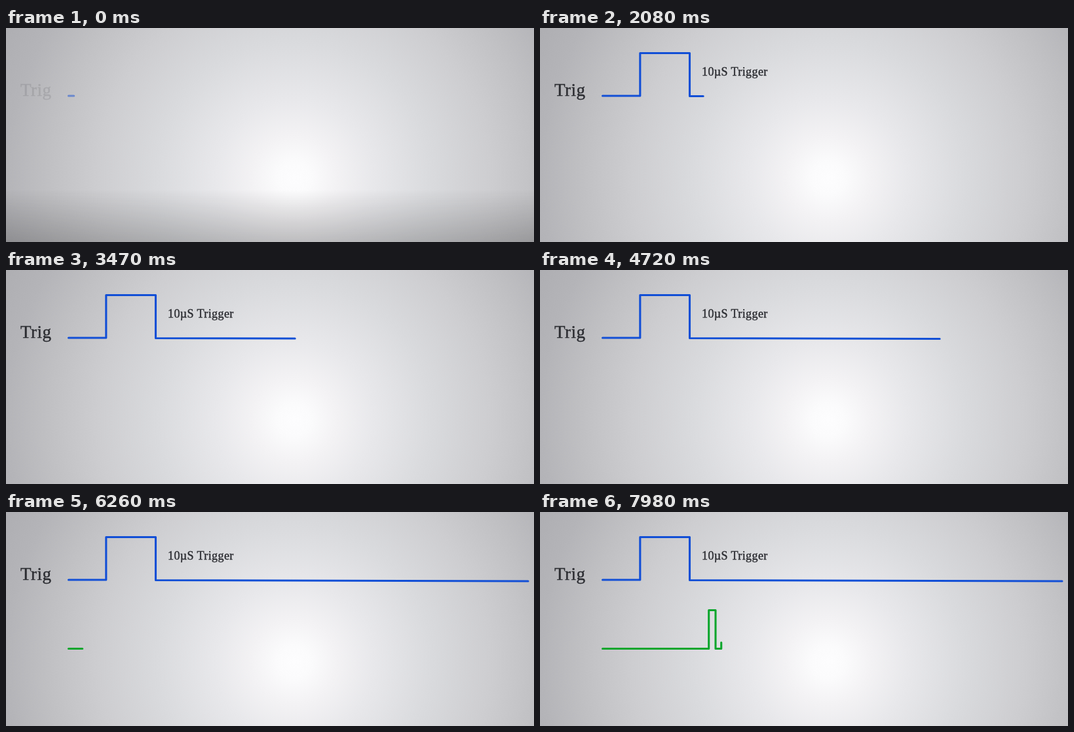
These frames come from a looping animation (806x328 px, 8 s). An HTML page:

```html
<!DOCTYPE html>
<html lang="en">
<head>
<meta charset="utf-8">
<title>Trigger timing</title>
<style>
  html, body { margin: 0; width: 100%; height: 100%; overflow: hidden; background: #c8c8cb; }
  svg { display: block; width: 806px; height: 328px; }
  text { font-family: "Liberation Serif", "Times New Roman", serif; fill: #2b2c31; stroke: #2b2c31; stroke-width: .4; }
  path { fill: none; stroke-width: 3.1; stroke-linecap: round; stroke-linejoin: round; }
</style>
</head>
<body>
<svg viewBox="0 0 806 328">
  <defs>
    <radialGradient id="glow" gradientUnits="userSpaceOnUse" cx="440" cy="230" r="500">
      <stop offset="0" stop-color="#fdfdfe"/>
      <stop offset=".05" stop-color="#fbfbfc"/>
      <stop offset=".13" stop-color="#f3f2f4"/>
      <stop offset=".24" stop-color="#e8e8eb"/>
      <stop offset=".42" stop-color="#d9dadd"/>
      <stop offset=".6" stop-color="#cdcdd0"/>
      <stop offset=".75" stop-color="#c0c0c3"/>
      <stop offset=".88" stop-color="#b4b4b8"/>
      <stop offset="1" stop-color="#aeaeb2"/>
    </radialGradient>
    <linearGradient id="shade" x1="0" y1="0" x2="0" y2="1">
      <stop offset="0" stop-color="#000" stop-opacity="0"/>
      <stop offset=".25" stop-color="#000" stop-opacity=".05"/>
      <stop offset="1" stop-color="#000" stop-opacity=".2"/>
    </linearGradient>
  </defs>
  <rect width="806" height="328" fill="url(#glow)"/>
  <rect id="floor" y="248" width="806" height="80" fill="url(#shade)"/>
  <text id="label" x="22" y="104" font-size="27" letter-spacing=".5">Trig</text>
  <text id="note" x="247" y="73" font-size="18" letter-spacing=".4">10µS Trigger</text>
  <path id="trigger" stroke="#124fd6" d="M95.5 104H152.8V38.5H228.5V104.5L797 106"/>
  <path id="burst" stroke="#0da62d" d="M95.5 209.5H257.7V150.5H268V209.5H276.7V200"/>
</svg>
<script>
  const LOOP = 8000;
  const HIDDEN = -4;

  // Each step is [time in ms, value]; the last value holds until the loop ends.
  function play(id, property, steps) {
    const frames = steps.map(([time, value]) => ({ offset: time / LOOP, [property]: value }));
    frames.push({ ...frames[frames.length - 1], offset: 1 });
    document.getElementById(id).animate(frames, { duration: LOOP, iterations: Infinity });
  }

  // Steps give the drawn length of the line.
  function draw(id, steps) {
    const path = document.getElementById(id);
    const length = path.getTotalLength();
    path.style.strokeDasharray = `${length} 2000`;
    play(id, "strokeDashoffset", steps.map(([time, drawn]) =>
      [time, Math.max(0, length - drawn)]));
  }

  draw("trigger", [[0, 8], [1340, 185], [2080, 285], [3470, 477], [4720, 646], [5800, 790], [6125, 840]]);
  draw("burst", [[0, HIDDEN], [6125, HIDDEN], [6130, 0], [6260, 21], [7980, 312]]);
  play("trigger", "opacity", [[0, .5], [150, 1]]);
  play("label", "opacity", [[0, .13], [450, 1]]);
  play("note", "opacity", [[0, 0], [1480, 0], [1900, 1]]);
  play("floor", "opacity", [[0, 1], [1720, 1], [1850, 0]]);
</script>
</body>
</html>
```
